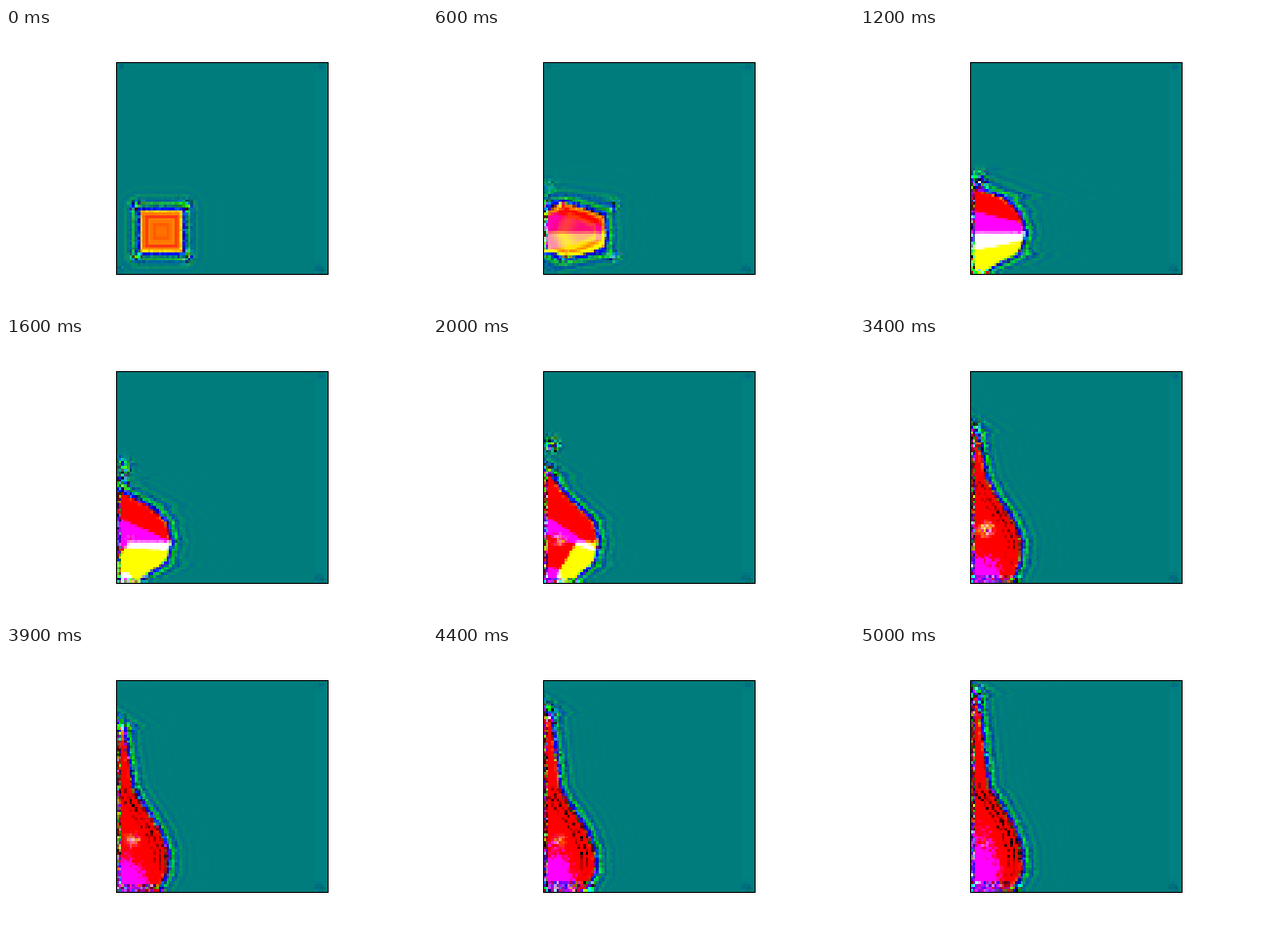
Animation, 432 px wide and 288 px high, one loop 5100 ms. Source, as a matplotlib script:

```python
import numpy as np
import matplotlib.pyplot as plt
from matplotlib.animation import FuncAnimation

W, H, DPI = 432, 288, 72
FRAMES, STEP = 51, 100
N = 80                       # grid cells per side
LEFT, TOP, SIDE = 112.7, 34.6, 217.4
TEAL = 0.49

cell = SIDE / N
xs = LEFT + (np.arange(N) + 0.5) * cell
ys = TOP + (np.arange(N) + 0.5) * cell
X, Y = np.meshgrid(xs, ys)

rng = np.random.default_rng(4)
NOISE = rng.normal(0, 1, (2, 3, N, N))

# Right edge of the blob at a few heights, one row per key time
TIMES = [1200, 2000, 2600, 3400, 4400, 5000]
EDGE_Y = [145, 160, 175, 190, 210, 230, 247]
EDGE_X = np.array([
    [60, 105, 147, 162, 169, 162, 130],
    [122, 133, 148, 164, 169, 164, 145],
    [130, 140, 152, 163, 169, 162, 149],
    [129, 137, 147, 157, 165, 163, 156],
    [129, 137, 148, 157, 165, 166, 157],
    [131, 142, 151, 159, 165, 166, 157],
])


def key(t, *values):
    return np.interp(t, TIMES, values)


def soft(v, width=3.0):
    return np.clip(0.5 + v / width, 0, 1)


def bump(cx, cy, rx, ry):
    return np.exp(-((X - cx) / rx) ** 2 - ((Y - cy) / ry) ** 2)


def square_distance():
    dx = 22 - abs(X - 159)
    dy = 21.5 - abs(Y - 208.5)
    outside = -np.hypot(np.minimum(dx, 0), np.minimum(dy, 0))
    return np.where((dx > 0) & (dy > 0), np.minimum(dx, dy), outside), dx, dy


SQUARE, SQ_DX, SQ_DY = square_distance()
SQ_CORNERS = np.exp(-(SQ_DX + 4) ** 2 / 36 - (SQ_DY + 4) ** 2 / 36)


def tip_height(t):
    return key(t, 166, 143, 124, 100, 72, 53)


def blob_edge(t):
    tip = min(tip_height(t), 142)
    tip_x = key(t, 45, 118, 119, 119, 120, 120)
    rows = [key(t, *EDGE_X[:, i]) for i in range(len(EDGE_Y))]
    return np.interp(ys, [tip - 60, tip] + EDGE_Y, [tip_x - 90, tip_x] + rows)


def inner_colour(t, k, noise, core):
    """Green and blue levels inside the blob."""
    x0 = key(t, 95, 138, 157, 190, 200, 200)
    green = soft(np.minimum(Y - 210, X - x0 + 0.6 * (Y - 225)))

    run = X - 118
    mid = key(t, 208, 194, 190, 190, 190, 190)
    mid = mid + key(t, 0.03, 0.5, 0.6, 0.6, 0.6, 0.6) * run
    half = key(t, 20, 9, -8, -20, -20, -20) - key(t, 0.23, 0.15, 0, 0, 0, 0) * run
    blue = soft(half - abs(Y - mid))
    rx = key(t, 1, 10, 18, 22, 23, 21)
    ry = key(t, 1, 10, 15, 22, 36, 52)
    pool = 1 - np.hypot((X - 122) / rx, (Y - 247) / ry)
    blue = np.maximum(blue, soft(pool + 0.12 * noise[2], 0.6))

    green = (1 - k) * 0.42 + k * (1.8 * green - 0.4)
    blue = (1 - k) * -0.2 + k * (1.8 * blue - 0.4)
    mix = np.clip(1.1 * core, 0, 1)
    return green + mix * (0.6 - green), blue + mix * (0.5 - blue)


def field(t):
    k = min(t / 1200, 1) ** 1.4
    edge = blob_edge(t)
    slope = np.gradient(edge, cell)
    blob = (edge[:, None] - X) / np.sqrt(1 + slope[:, None] ** 2)
    d = (1 - k) * SQUARE + k * blob

    phase = 2 * np.pi * t / 1600
    noise = NOISE[0] * np.cos(phase) + NOISE[1] * np.sin(phase)

    # Noisy places: wall, floor, jet tip, loose spray and the swirl core
    wet = soft(d + 6, 4)
    wall = wet * (X < 118.5)
    floor = wet * (Y > key(t, 247, 247, 246, 245, 242, 241))
    tip = k * bump(118, tip_height(t) - 3, 8, 9)
    spray_y = key(t, 156, 111, 88, 78, 70, 70) + 0.05 * max(1200 - t, 0)
    spray = soft(t - 800, 400) * key(t, 0.9, 1.1, 0.3, 0, 0, 0)
    spray = spray * bump(120, spray_y, 9, 8)
    core = k * key(t, 0.1, 0.8, 1.1, 1.1, 0.7, 0.5)
    core = core * bump(129, key(t, 205, 208, 202, 197, 200, 202), 10, 9)

    base = soft(d) * (1 - 0.55 * wall) * (1 - 0.4 * floor)
    ring = np.exp(-abs(d) / 6.5) * np.sin(2 * np.pi * d / 8.5)
    near = np.exp(-abs(d) / np.where(d > 0, 1.5, 5.0))
    near = near * (0.25 + k * (0.2 + 0.5 * np.exp(-(X - 113) / 12)))
    rough = near + 0.6 * wall + 0.6 * floor + 0.7 * spray + 0.5 * tip
    rough = rough + 0.5 * core + (1 - k) * 0.6 * SQ_CORNERS

    green, blue = inner_colour(t, k, noise, core)
    amp = 0.55 + 0.15 * k
    r = 1.1 * base + 0.3 * ring * (1 - k) + 0.45 * rough * noise[0]
    g = TEAL * (1 - base) + base * green + amp * ring + 0.7 * rough * noise[1]
    b = TEAL * (1 - base) + base * blue - 0.75 * ring + 0.7 * rough * noise[2]

    # Dark streaks running along the right flank
    flank = soft(d) * soft(14 - d, 6) * soft(Y - 145, 20) * soft(228 - Y, 30)
    streak = np.sin(2 * np.pi * d / 6) + 0.4 * noise[0] - 0.1
    r = r - key(t, 0, 0.1, 0.3, 0.55, 0.9, 1.0) * flank * np.maximum(streak, 0)

    # Faint ripples beside the borders
    u, v = (X - LEFT) / cell, (Y - TOP) / cell
    lines = (abs(u - 77) < 1.6) * 0.012 + (abs(v - 2) < 1.1) * 0.008
    corner = bump(321, 40, 5, 3) + bump(321, 247, 5, 4)
    corner = corner + (1 - k) * (bump(117, 40, 5, 3) + bump(117, 247, 5, 4))
    g = g + lines - 0.07 * corner * (1 + 0.8 * NOISE[0, 1])
    b = b + lines + 0.06 * corner * NOISE[0, 2]
    return np.clip(np.dstack([r, g, b]), 0, 1)


fig = plt.figure(figsize=(W / DPI, H / DPI), dpi=DPI, facecolor="white")
ax = fig.add_axes([LEFT / W, 1 - (TOP + SIDE) / H, SIDE / W, SIDE / H])
ax.set_xticks([])
ax.set_yticks([])
for spine in ax.spines.values():
    spine.set_linewidth(1)
image = ax.imshow(field(0), interpolation="nearest", aspect="auto")


def draw(i):
    image.set_data(field(i * STEP))
    return (image,)


anim = FuncAnimation(fig, draw, frames=FRAMES, interval=STEP, repeat=True,
                     repeat_delay=0, blit=False)
plt.show()
```
